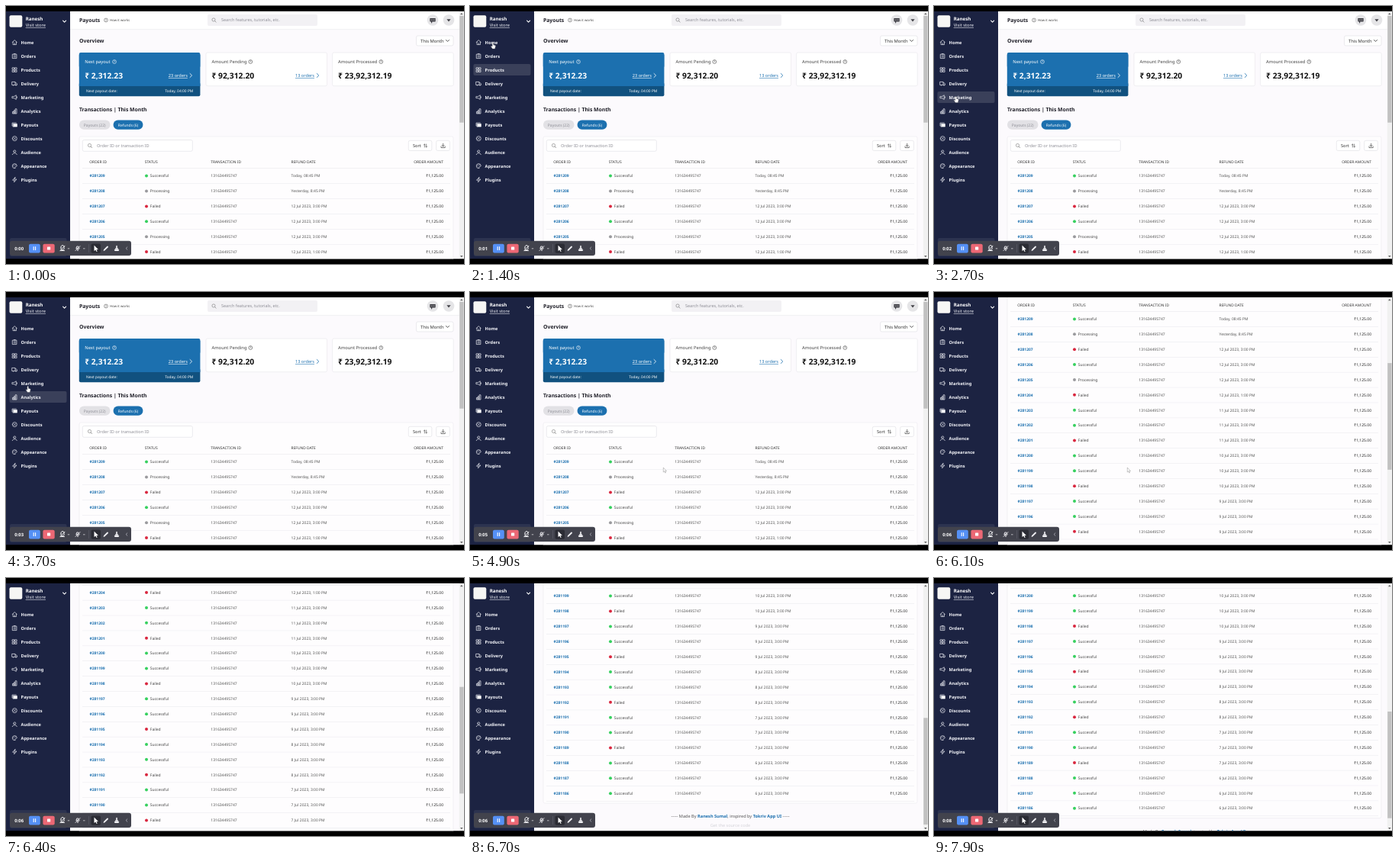
Write an HTML page that moves like this. It is 600 px wide and 338 px high and loops after 8 s.

```html
<!DOCTYPE html>
<html lang="en">
<head>
<meta charset="utf-8">
<title>Payouts dashboard</title>
<style>
html, body { margin: 0; width: 100%; height: 100%; overflow: hidden; background: #000; }
svg { display: block; width: 600px; height: 338px; font-family: "Noto Sans", "Open Sans", sans-serif; }
text { white-space: pre; text-rendering: geometricPrecision; }
.line { fill: none; stroke-linecap: round; stroke-linejoin: round; }
</style>
</head>
<body>
<svg id="stage" viewBox="0 0 600 338"></svg>
<script>
const LOOP = 8000, STEP = 100;
const BLUE = '#1c70af', INK = '#1d1d26', GREY = '#8e8e96', BORDER = '#dedde3';

// y is the middle of the capitals
const text = (x, y, size, fill, str, weight = 400, extra = '') =>
  `<text x="${x}" y="${y + size * 0.36}" font-size="${size}" fill="${fill}" font-weight="${weight}" ${extra}>${str}</text>`;
const rect = (x, y, w, h, fill, r = 0, stroke = 'none') =>
  `<rect x="${x}" y="${y}" width="${w}" height="${h}" rx="${r}" fill="${fill}" stroke="${stroke}" stroke-width=".6"/>`;
const circle = (x, y, r, fill, stroke = 'none') =>
  `<circle cx="${x}" cy="${y}" r="${r}" fill="${fill}" stroke="${stroke}" stroke-width=".6"/>`;
const line = (x, y, d, stroke, width = 0.7) =>
  `<path class="line" transform="translate(${x} ${y})" d="${d}" stroke="${stroke}" stroke-width="${width}"/>`;
const down = (x, y, color, width = 1) => line(x, y, 'M-2 -1L0 1L2 -1', color, width);
const right = (x, y, color) => line(x, y, 'M-1.3 -2.5L1.3 0L-1.3 2.5', color, 0.8);
const help = (x, y, color) => circle(x, y, 2.4, 'none', color) + text(x, y, 3.4, color, '?', 600, MIDDLE);
const lens = (x, y) => circle(x - 0.5, y - 0.5, 2.1, 'none', '#777') + line(x, y, 'M1.2 1.2L2.6 2.6', '#777');
const END = 'text-anchor="end"', MIDDLE = 'text-anchor="middle"', LINK = 'text-decoration="underline"';

function header() {
  return rect(84, 7, 510, 24, '#fff') + rect(84, 30.5, 510, 0.6, '#e6e5ea') +
    text(96, 19, 6.8, INK, 'Payouts', 600) +
    help(131, 18.5, '#555') + text(136, 18.5, 4.3, '#444', 'How it works') +
    rect(264, 11, 144, 15, '#f2f1f4', 2) + lens(272.5, 18.5) +
    text(282, 18.5, 5.5, GREY, 'Search features, tutorials, etc.') +
    circle(559, 18.5, 7.3, '#e5e5e7') + rect(555.3, 16, 7.4, 4.4, '#3f3f45', 0.6) +
    line(559, 18.2, 'M-2 0H-1.6M0 0H.3M1.8 0H2.2', '#e5e5e7', 0.8) + line(557.6, 20.4, 'M0 0V1.4', '#3f3f45', 1.2) +
    circle(580, 18.5, 7.3, '#e5e5e7') +
    `<path d="M577.4 17.2h5.2l-2.6 3.2z" fill="#3f3f45"/>` +
    text(96, 46, 6.9, INK, 'Overview', 600) +
    rect(537.5, 39, 48.5, 13, '#fff', 2, BORDER) + text(543, 45.5, 5.8, '#333', 'This Month') +
    down(578.5, 45.5, '#333', 0.8);
}

function card(x, title, helpX, amount, orders, main) {
  const ink = main ? '#fff' : '#111', soft = main ? '#fff' : '#444', link = main ? '#fff' : BLUE;
  const box = main
    ? rect(x, 100, 158.6, 18.3, '#11517f', 2) + rect(x, 61, 158.6, 20, BLUE, 2) + rect(x, 64, 158.6, 41, BLUE) +
      text(105, 111.5, 4.9, '#fff', 'Next payout date:') + text(245.3, 111.5, 4.9, '#fff', 'Today, 04:00 PM', 400, END)
    : rect(x, 61, 158.6, 43.7, '#fff', 2, '#e6e5ea');
  return box + text(x + 7.5, 73, 5.8, soft, title) + help(helpX, 73, soft) +
    text(x + 7.5, 91, 10.3, ink, amount, 600) +
    (orders ? text(x + 117, 91, 5.6, link, orders, 400, LINK) + right(x + 146.5, 91, link) : '');
}

function table() {
  const dots = { S: ['#37d05f', 'Successful'], P: ['#9a9a9e', 'Processing'], F: ['#d9273f', 'Failed'] };
  const head = (x, label, extra) => text(x, 204.7, 4.9, '#333', label, 500, extra);
  let out = rect(96, 171, 490, 522, '#fefdfe', 2, '#ebeaef') +
    rect(100.3, 175.5, 144, 14.8, '#fff', 2, BORDER) + lens(110, 183) +
    text(119, 183, 5.6, GREY, 'Order ID or transaction ID') +
    rect(527.3, 176.3, 30.5, 13.2, '#fff', 2, BORDER) + text(533, 183, 5.6, '#333', 'Sort') +
    line(549.5, 183, 'M-1.2 2V-2M-2.2 -1L-1.2 -2L-.2 -1M1.2 -2V2M.2 1L1.2 2L2.2 1', '#444', 0.6) +
    rect(563.7, 176.3, 17.6, 13.2, '#fff', 2, BORDER) +
    line(572.6, 183, 'M0 -2.8V1M-1.5 -.5L0 1L1.5 -.5M-2.6 1V2.6H2.6V1', '#444', 0.7) +
    head(109.3, 'ORDER ID') + head(181.8, 'STATUS') + head(268.2, 'TRANSACTION ID') +
    head(373.6, 'REFUND DATE') + head(573, 'ORDER AMOUNT', END) + rect(100, 212.4, 482, 0.6, '#e9e8ed');
  [...'SPFSPFSSFSSFSSFSSFSSFSSS'].forEach((key, i) => {
    const y = 222.6 + i * 19.89, [color, label] = dots[key];
    const date = ['Today, 08:45 PM', 'Yesterday, 8:45 PM'][i] ||
      `${Math.min(12, 13 - Math.floor(i / 3))} Jul 2023, ${i === 5 ? 1 : 3}:00 PM`;
    out += text(109.5, y, 4.95, BLUE, '#' + (281209 - i), 600) +
      circle(184, y, 2, color) + text(188.8, y, 5, '#444', label) +
      text(268.3, y, 5, '#555', '131634495747') + text(373.6, y, 5, '#555', date) +
      text(573, y, 5, '#222', '₹1,125.00', 400, END) + rect(100, y + 9.8, 482, 0.6, '#ecebf0');
  });
  return out;
}

function page() {
  const name = s => `<tspan fill="${BLUE}" font-weight="600">${s}</tspan>`;
  return rect(84, 7, 510, 730, '#fcfafd') + header() +
    card(95.8, 'Next payout', 142, '₹ 2,312.23', '23 orders', true) +
    card(262, 'Amount Pending', 320.3, '₹ 92,312.20', '13 orders') +
    card(427.6, 'Amount Processed', 491.3, '₹ 23,92,312.19') +
    text(96, 136, 6.8, INK, 'Transactions | This Month', 600) +
    rect(96, 149.5, 40.5, 12.2, '#e2e1e5', 6) + text(116.2, 155.7, 5, GREY, 'Payouts (22)', 400, MIDDLE) +
    rect(140.6, 149.5, 38.8, 12.2, BLUE, 6) + text(160, 155.7, 5, '#fff', 'Refunds (6)', 400, MIDDLE) +
    table() +
    text(341, 710.2, 5.6, '#555', `----- Made By ${name('Ranesh Sumal')}, inspired by ${name('Tokriv App UI')} -----`, 400, MIDDLE) +
    text(341, 722, 5.6, '#d4d3d9', 'Get the source code', 400, MIDDLE);
}

const MENU = [
  ['Home', 'M-3 0L0 -3L3 0M-2.2 -.6V3H2.2V-.6M0 3V1'],
  ['Orders', 'M-2.6 -2.4H2.6V3H-2.6ZM-1 -3H1M-1.2 -.6H1.2M-1.2 1.2H1.2'],
  ['Products', 'M-2.8 -2.8H-.5V-.5H-2.8ZM.6 -2.8H2.8V-.5H.6ZM-2.8 .6H-.5V2.8H-2.8ZM.6 .6H2.8V2.8H.6Z'],
  ['Delivery', 'M-3.2 -2.2H.8V1.8H-3.2ZM.8 -.8H2.2L3.2 .5V1.8H.8M-2 2.5h.4M1.6 2.5h.4'],
  ['Marketing', 'M-3 -1H-1L2 -2.8V2.8L-1 1H-3ZM3.1 -.8V.8'],
  ['Analytics', 'M-2.8 3V.8H-1V3ZM-1 3V-.8H.8V3ZM.8 3V-2.8H2.7V3Z'],
  ['Payouts', 'M-3.2 1.2V-2.5H2M-2 -1.2H3.2V2.5H-2Z'],
  ['Discounts', 'M-3 0A3 3 0 1 1 3 0A3 3 0 1 1 -3 0M-1.1 1.1L1.1 -1.1M-1 -1h.1M1 1h.1'],
  ['Audience', 'M-1.5 -1.2A1.5 1.5 0 1 1 1.5 -1.2A1.5 1.5 0 1 1 -1.5 -1.2M-3 3C-2.5 .4 2.5 .4 3 3'],
  ['Appearance', 'M.5 3A3 3 0 1 1 3 -.3C3 1 .6 .5 .5 1.5ZM-1.3 0h.1M-.6 -1.5h.1M1.2 -1.4h.1'],
  ['Plugins', 'M.7 -3.2L-2.7 .6H0L-.7 3.2L2.7 -.6H0Z']
];
const itemY = i => 47.6 + 18 * i;

function sidebar() {
  return rect(0, 7, 84, 324.5, '#1c2342') + rect(5, 304, 74.5, 24, '#2c3350', 2) +
    rect(4.5, 12.3, 16.8, 15.4, '#f6f6f4', 2) +
    text(25.7, 16.9, 6.2, '#fff', 'Ranesh', 600) + text(25.7, 25.3, 5.7, '#eceef4', 'Visit store', 400, LINK) +
    down(76.6, 20.2, '#fff', 1.1) + `<g id="hover">${rect(4.5, 112, 75, 15, '#3a405a', 2)}</g>` +
    MENU.map(([label, icon], i) =>
      line(11.3, itemY(i), icon, '#eceef4', 0.7) +
      (label === 'Payouts' ? rect(9.5, itemY(i) - 1, 4.8, 3.3, '#fff', 0.5) : '') +
      text(19.6, itemY(i), 5.7, '#f2f3f8', label, 600)).join('');
}

function recorder() {
  const white = '#f0f0f3', y = 317.5;
  return rect(5, 307.7, 159, 19.2, '#42434d', 3) +
    `<text id="clock" x="11.3" y="319.7" font-size="5.9" font-weight="600" fill="#fff"></text>` +
    rect(30, 311.7, 14.8, 11.8, '#5590f5', 2) + line(37.4, y, 'M-1.2 -2V2M1.2 -2V2', '#fff', 1.1) +
    rect(48.4, 311.7, 15.3, 11.8, '#ec6875', 2) + rect(54, 315.4, 4.2, 4.2, '#fff', 0.5) +
    line(74, y, 'M-2 -.8A2.2 2.2 0 1 1 2 -.8A2.2 2.2 0 1 1 -2 -.8M-2.5 3H2.5M-3.2 3.3L3 -3.3', white, 1) +
    line(94, y, 'M-1 -2.5H1V0H-1ZM-2.3 -.4C-2 2.4 2 2.4 2.3 -.4M0 1.8V3.2M-3 3L3 -3', white, 0.9) +
    line(82, y + 0.3, 'M-.8 0H.8', white, 0.7) + line(102.3, y + 0.3, 'M-.8 0H.8', white, 0.7) +
    rect(108, 312, 0.5, 11, '#666772') + rect(111.5, 311.5, 12.5, 12.2, '#2b2c34', 2) +
    `<path d="M115.5 313.5v7.6l1.9-1.7 1.2 2.5 1.1-.6-1.2-2.4h2.4z" fill="#fff"/>` +
    line(131, y, 'M-2.2 2.2L2 -2', white, 1.9) + line(131, y, 'M-2.9 3L-2 2', white, 0.8) +
    line(145, y, 'M0 -3V0M-1.4 .5H1.4', white, 1.6) + rect(142.2, 318.8, 5.6, 2.2, white, 0.4) +
    line(158, y, 'M.9 -1.7L-.9 0L.9 1.7', '#c4c5cd', 0.7);
}

const stage = document.getElementById('stage');
stage.innerHTML = `<clipPath id="view"><rect y="7" width="600" height="324.2"/></clipPath>
  <g clip-path="url(#view)"><g id="page">${page()}</g>
  ${rect(593.8, 7, 6.2, 325, '#f1f1f1')}<path d="M595 11.2h3.6l-1.8-2.2zM595 327h3.6l-1.8 2.2z" fill="#666"/>
  <g id="thumb">${rect(594.2, 13, 5.4, 139.7, '#c1c1c1')}</g>
  ${sidebar()}${recorder()}</g>
  <g id="cursor" stroke="#777" stroke-width=".4">
    <path id="arrow" d="M0 0V6L1.4 4.8L2.4 7L3.3 6.6L2.3 4.5H4.2Z" fill="#fff"/>
    <path id="hand" d="M-.8 .6Q0 -.6 .7 .6V3L3 3.6Q3.6 3.8 3.4 4.8L2.6 8H-.6L-2.6 5Q-2.4 4 -.8 5Z" fill="#fff"/>
  </g>`;
const [pageEl, thumb, hover, clock, cursor, arrow, hand] =
  ['page', 'thumb', 'hover', 'clock', 'cursor', 'arrow', 'hand'].map(id => document.getElementById(id));

// Each key: time, then one or more values
const SCROLL = [[5100, 0], [5200, 35], [5300, 98], [5400, 153], [5500, 168], [5700, 175.7], [6000, 175.7],
  [6100, 187.2], [6300, 262], [6600, 385], [6700, 397.9], [6900, 401], [7100, 401], [7200, 402], [7700, 402], [7800, 394], [7900, 378.4]];
const POINTER = [[600, 55, 300], [1400, 30, 48], [1500, 36, 26], [2000, 36, 22], [2200, 36, 22], [2300, 30, 46],
  [2600, 28.7, 114], [2700, 28.7, 118.5], [3100, 29, 150], [3400, 29, 174], [3500, 29, 174], [3600, 28.7, 140], [3700, 28.7, 123.3],
  [4000, 28.7, 66], [4400, 34, 46], [4500, 62, 90], [4600, 185, 195], [4700, 253.3, 230]];

function at(keys, t) {
  const next = keys.findIndex(k => k[0] > t);
  if (next <= 0) return keys.at(next).slice(1);
  const a = keys[next - 1], b = keys[next], f = (t - a[0]) / (b[0] - a[0]);
  return a.slice(1).map((v, i) => v + (b[i + 1] - v) * f);
}

function itemUnder(t) {
  const [x, y] = at(POINTER, t), i = Math.round((y - itemY(0)) / 18);
  return t >= 600 && x < 80 && i >= 0 && i < MENU.length ? i : -1;
}

const show = (el, on) => el.setAttribute('visibility', on ? 'visible' : 'hidden');
const move = (el, x, y) => el.setAttribute('transform', `translate(${x} ${y})`);

function draw(now) {
  const t = Math.floor(now % LOOP / STEP) * STEP;
  const [scroll] = at(SCROLL, t);
  move(pageEl, 0, -scroll);
  move(thumb, 0, scroll * 0.428);
  clock.textContent = '0:0' + Math.floor((t + 100) / 1000);

  // The highlight trails the pointer by one step
  const item = itemUnder(t - STEP);
  show(hover, item >= 0);
  move(hover, 0, 18 * (item - 4));

  const seen = t >= 600 && t < 6300, pointing = itemUnder(t) >= 0;
  move(cursor, ...at(POINTER, t));
  show(arrow, seen && !pointing);
  show(hand, seen && pointing);
  requestAnimationFrame(draw);
}
draw(performance.now());
</script>
</body>
</html>
```
